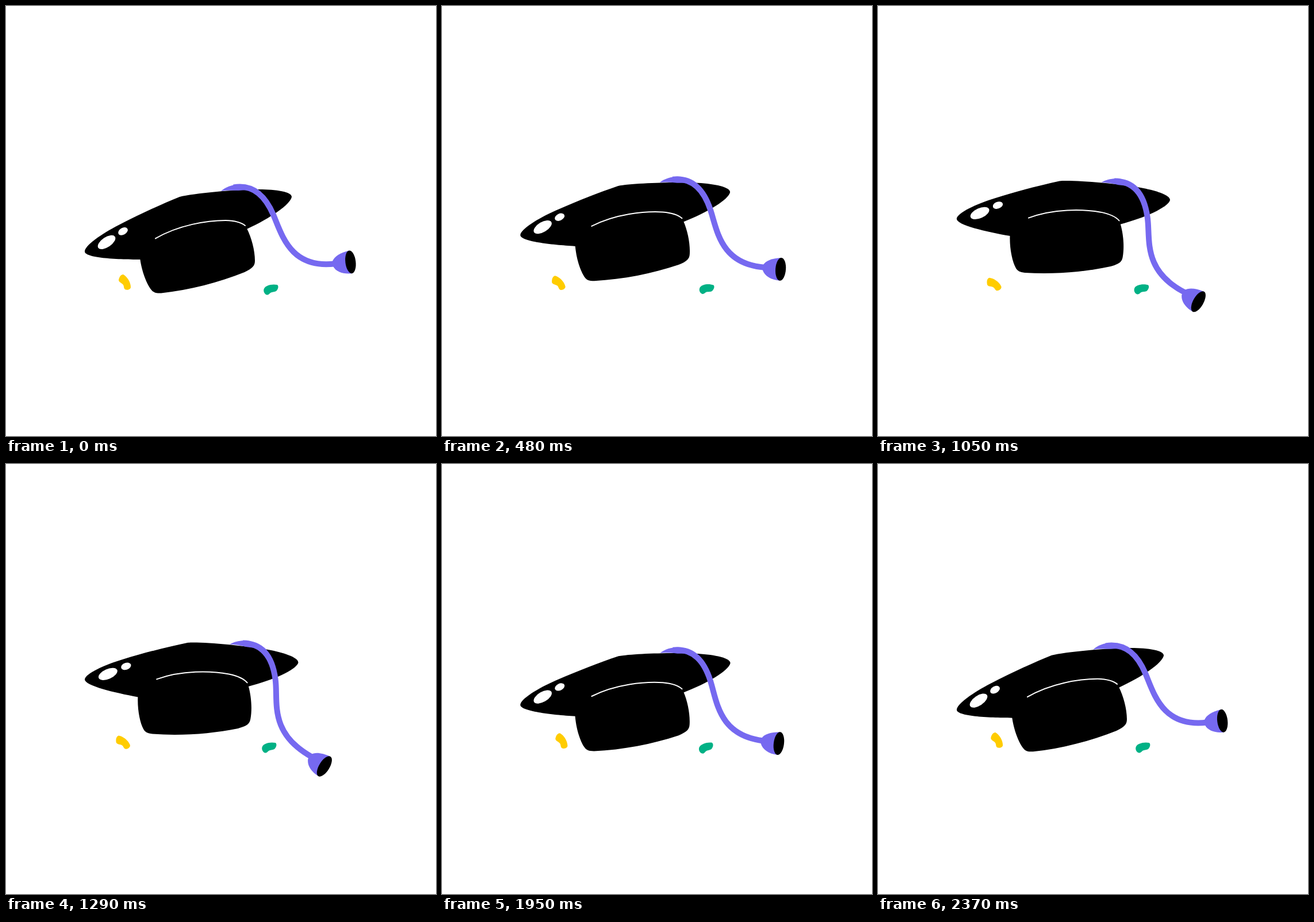
An HTML page without scripts that plays this animation: 748x748 px, repeating every 2400 ms.

```html
<!DOCTYPE html>
<html lang="en">
<head>
<meta charset="utf-8">
<title>Graduation cap</title>
<style>
  html, body { margin: 0; width: 100%; height: 100%; overflow: hidden; background: #fff; }
  svg { display: block; width: 100%; height: 100%; }

  /* Every part swings on the same sine curve; only phase and range differ. */
  .swing {
    animation: shift, turn;
    animation-duration: 1.2s;
    animation-timing-function: cubic-bezier(.364, 0, .636, 1);
    animation-iteration-count: infinite;
    animation-direction: alternate;
    animation-delay: var(--shift-delay, 0s), var(--turn-delay, 0s);
  }
  @keyframes shift {
    from { translate: var(--from, 0 0); }
    to { translate: var(--to, 0 0); }
  }
  @keyframes turn {
    from { rotate: var(--tilt-from, 0deg); }
    to { rotate: var(--tilt-to, 0deg); }
  }
  @keyframes droop {
    from { d: path("M396 315.5C432 309.5 452 333 465 363C480 398 495 458 573 448"); }
    to { d: path("M396 315.5C432 309.5 452 333 463 367C475 402 467 460 548 488"); }
  }

  .cap {
    --from: 0 5.1px; --to: 0 -24.1px; --shift-delay: -.33s;
    --tilt-from: 0deg; --tilt-to: 10.5deg; --turn-delay: -2.37s;
    transform-origin: 338px 409px;
  }
  .cord { animation-name: droop; animation-delay: -2.345s; }
  .tassel {
    --from: 599.5px 445px; --to: 574.3px 500.9px; --shift-delay: -2.345s;
    --tilt-from: -7deg; --tilt-to: 21.5deg; --turn-delay: -2.345s;
    transform-origin: 0 0;
  }

  .sway { animation-name: shift; }
  .yellow { --from: 1.4px 0; --to: -5.8px 0; --shift-delay: -.35s; }
  .yellow path {
    --from: 0 0; --to: 0 3.8px; --shift-delay: 0s;
    --tilt-from: 1.7deg; --tilt-to: -24.3deg; --turn-delay: -.2s;
    transform-origin: 206.5px 480.5px;
  }
  .green { --from: .1px 0; --to: -3.1px 0; --shift-delay: -2.25s; }
  .green path {
    --from: 0 -.9px; --to: 0 .7px; --shift-delay: -1.75s;
    --tilt-from: 7deg; --tilt-to: -5deg; --turn-delay: -1.75s;
    transform-origin: 461px 493.5px;
  }
</style>
</head>
<body>
<svg viewBox="0 0 748 748">
  <g class="swing sway yellow" fill="#ffcc00">
    <path class="swing" d="M204 467C210 470 217 480 217 489C217 493 211 495 207 493C204 490 206 487 203 484C200 481 197 481 196 477C197 471 200 467 204 467Z"/>
  </g>
  <g class="swing sway green" fill="#00b185">
    <path class="swing" d="M454 487C460 484 467 484 472 485C475 488 473 493 470 496C466 498 463 497 460 499C457 502 455 504 451 501C447 497 447 490 454 487Z"/>
  </g>

  <g class="swing cap">
    <path d="M137 427C137 417 165 397 196 381C235 361 270 345 302 332C325 326 400 319 440 319C470 319 497 323 497 332C495 345 460 369 419 388L234 441C190 441 137 438 137 427Z"/>
    <path d="M233 438C236 462 245 484 253 494C257 499 261 500 270 499.500C320 494 370 481 415 463C429 456 433 452 433 443C433 425 427 403 419 387Z"/>
    <path d="M260 404.500C300 381 350 373 382 373C400 373.500 410 377 416 382" fill="none" stroke="#fff" stroke-width="2" stroke-linecap="round"/>
    <g fill="#fff">
      <ellipse rx="17.500" ry="8.700" transform="translate(175 411) rotate(-34)"/>
      <ellipse rx="9" ry="5.900" transform="translate(203.500 392) rotate(-30)"/>
    </g>

    <g fill="#7669f0">
      <path d="M374 322C382 315 392 311 406 310L420 320L404 321Q385 320 374 322Z"/>
      <path class="swing cord" d="M396 315.500C432 309.500 452 333 465 363C480 398 495 458 573 448" fill="none" stroke="#7669f0" stroke-width="10"/>
      <g class="swing tassel">
        <path d="M0-20C-16-18-27-13-31-5V4C-27 14-15 20 0 20Z"/>
        <ellipse rx="9" ry="20" fill="#000"/>
      </g>
    </g>
  </g>
</svg>
</body>
</html>
```
